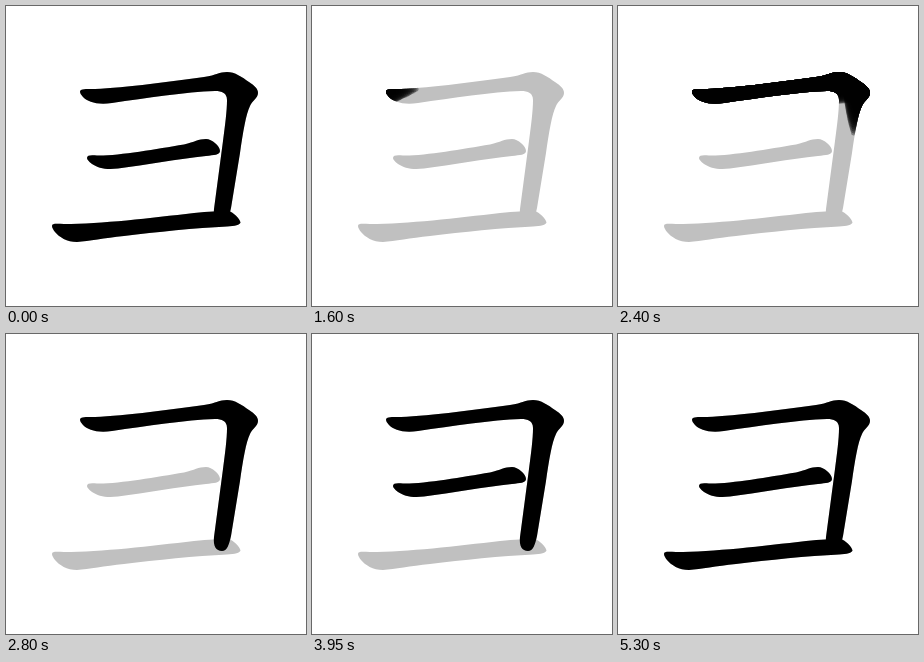
An HTML page with a canvas that plays this animation: 300 px wide and 300 px high, repeating every 6.3 s.

```html
<!DOCTYPE html>
<html lang="ja">
<head>
<meta charset="utf-8">
<title>ヨ stroke order</title>
<style>
html, body { margin: 0; width: 100%; height: 100%; overflow: hidden; background: #fff; }
canvas { display: block; }
</style>
</head>
<body>
<canvas id="stage" width="300" height="300"></canvas>
<script>
const ctx = document.getElementById('stage').getContext('2d');
const LOOP = 6300, STEP = 100, RADIUS = 24, TAPER = 48, LAYERS = 24, START_X = -20;

// runs: [start time, number of steps]; the brush tip is at origin + pace * steps along the route
const strokes = [
  {
    shape: `M74 86C74 83 78 83 84 83C110 83 160 76 198 71C211 69 213 66 221 66
      C229 66 236 71 243 76C249 80 252 83 252 87C252 92 246 95 244 100C240 108 237 126 234 147
      L225 202C223 211 221 217 216 217C210 217 207 212 208 203L217 135C219 120 221 105 221 94
      C221 87 216 85 209 85C180 86 140 92 106 97C91 99 82 96 77 91Q74 88 74 86Z`,
    route: `M${START_X} 93L244 72L222 217`,
    runs: [[1500, 2], [1750, 6], [2400, 5]], origin: 53, pace: 28
  },
  {
    shape: `M81 152C81 149 85 149 91 149.5C112 150 150 143 178 138.5C189 136 192 133 200 133
      C206 133 214 140 214 145C214 149 208 149 200 150C172 153 140 159 112 162.5
      C100 164 92 162 86 158Q81 154 81 152Z`,
    route: `M${START_X} 169L240 137`,
    runs: [[3300, 2], [3550, 5]], origin: 62, pace: 26
  },
  {
    shape: `M46 220C46 217 51 218 58 218C95 218 145 212 188 207C203 205.5 213 205 223 205
      C227 206 234 213 234.5 216.5C234 219 229 220 221 220.5C190 222 150 226 118 230
      C98 232 83 235 71 236C61 236 53 231 49 226Q46 222 46 220Z`,
    route: `M${START_X} 239L250 216`,
    runs: [[4450, 2], [4700, 7]], origin: 30, pace: 26
  }
];

for (const stroke of strokes) {
  stroke.shape = new Path2D(stroke.shape);
  stroke.route = new Path2D(stroke.route);
  stroke.total = stroke.runs.reduce((sum, [, count]) => sum + count, 0);
}

function stepsDone(runs, time) {
  return runs.reduce((sum, [start, count]) =>
    sum + Math.max(0, Math.min(count, Math.floor((time - start) / STEP) + 1)), 0);
}

function fill(shape, color) {
  ctx.fillStyle = color;
  ctx.fill(shape);
}

// Stacked strokes, each shorter and wider than the last, give a soft pointed front.
function brush({ shape, route, origin, pace }, steps) {
  const tip = origin + pace * steps - START_X;
  ctx.save();
  ctx.clip(shape);
  ctx.lineCap = ctx.lineJoin = 'round';
  ctx.globalAlpha = 0.35;
  for (let i = 1; i <= LAYERS; i++) {
    const back = i / LAYERS, radius = RADIUS * back ** 0.7;
    ctx.lineWidth = radius * 2;
    ctx.setLineDash([tip - TAPER * back - radius, 9999]);
    ctx.stroke(route);
  }
  ctx.restore();
}

function draw(now) {
  let time = now % LOOP;
  if (time < 1000) time += LOOP; // the finished character is held across the loop
  ctx.fillStyle = '#fff';
  ctx.fillRect(0, 0, 300, 300);
  for (const { shape } of strokes) fill(shape, '#c0c0c0');
  for (const stroke of strokes) {
    const steps = stepsDone(stroke.runs, time);
    if (steps === stroke.total) fill(stroke.shape, '#000');
    else if (steps) brush(stroke, steps);
  }
}

const begin = performance.now();
function tick() {
  draw(performance.now() - begin);
  requestAnimationFrame(tick);
}
tick();
</script>
</body>
</html>
```
